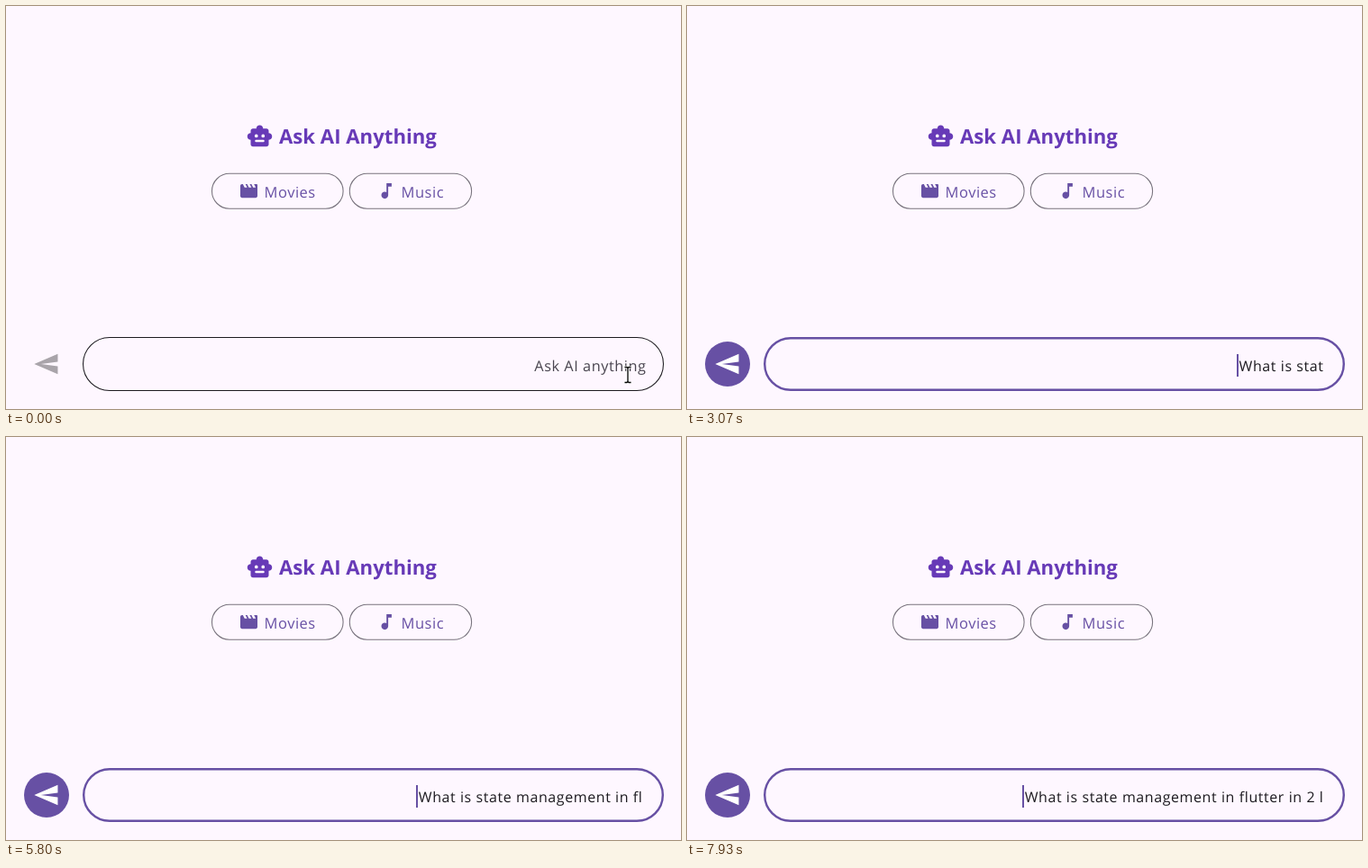
An HTML page for the animation above (8000 ms loop, 749 px wide and 448 px high).

```html
<!DOCTYPE html>
<html lang="en">
<head>
<meta charset="utf-8">
<title>Ask AI Anything</title>
<style>
  html, body { margin: 0; width: 100%; height: 100%; overflow: hidden; background: #fef7ff; }
  body { position: relative; font-family: "Open Sans", sans-serif; text-rendering: geometricPrecision; }
  svg { position: absolute; left: 0; top: 0; display: block; }
  .title { font-size: 22.2px; font-weight: 700; fill: #673ab7; }
  .chip rect { fill: none; stroke: #79747e; stroke-width: 1.07; }
  .chip text { font-size: 16.5px; font-weight: 500; letter-spacing: .5px; }
  .chip { fill: #6750a4; }
  .hint { font-size: 16.3px; letter-spacing: .55px; fill: #49454f; text-anchor: end; }
  .typed {
    position: absolute; left: 85px; top: 387px; width: 621.5px; height: 26px;
    direction: rtl; font-size: 16px; line-height: 26px; letter-spacing: .58px; color: #1d1b20;
  }
  .line { position: absolute; right: 0; top: 0; height: 26px; white-space: pre; }
  #caret { position: absolute; top: -.5px; width: 2.2px; height: 25px; background: #6750a4; }
</style>
</head>
<body>
<svg width="749" height="448" viewBox="0 0 749 448">
  <path transform="translate(266.5 130) scale(1.25)" fill="#673ab7" fill-rule="evenodd" d="M20 9V7c0-1.1-.9-2-2-2h-3c0-1.66-1.34-3-3-3S9 3.34 9 5H6c-1.1 0-2 .9-2 2v2c-1.66 0-3 1.34-3 3s1.34 3 3 3v4c0 1.1.9 2 2 2h12c1.1 0 2-.9 2-2v-4c1.66 0 3-1.34 3-3s-1.34-3-3-3zM7.5 11.5a1.5 1.5 0 0 1 3 0a1.5 1.5 0 0 1-3 0zM8.8 17a1 1 0 0 1 0-2h6.4a1 1 0 0 1 0 2zM13.5 11.5a1.5 1.5 0 0 1 3 0a1.5 1.5 0 0 1-3 0z"/>
  <text class="title" x="303" y="153">Ask AI Anything</text>

  <g class="chip">
    <rect x="228.5" y="186.3" width="145.6" height="38.9" rx="19.45"/>
    <path transform="translate(258.1 194.2) scale(.95)" d="M18 4l2 4h-3l-2-4h-2l2 4h-3l-2-4H8l2 4H7L5 4H4c-1.1 0-2 .9-2 2v12c0 1.1.9 2 2 2h16c1.1 0 2-.9 2-2V5q0-1-1-1z"/>
    <text x="286.6" y="213">Movies</text>
  </g>
  <g class="chip">
    <rect x="381.3" y="186.3" width="135.3" height="38.9" rx="19.45"/>
    <path transform="translate(410.8 194.2) scale(.95)" d="M12 3v10.55c-.59-.34-1.27-.55-2-.55-2.21 0-4 1.79-4 4s1.79 4 4 4 4-1.79 4-4V7h4V3z"/>
    <text x="438.6" y="213">Music</text>
  </g>

  <circle id="disc" cx="45" cy="398" r="25" fill="#6750a4"/>
  <path id="plane" transform="translate(59.93 383.07) scale(-1.244 1.244)" d="M2 21L23 12 2 3v7l15 2-15 2z"/>
  <rect id="field" fill="none"/>
  <text id="hint" class="hint" x="710.5" y="406">Ask AI anything</text>
</svg>

<div class="typed"><div class="line"><span id="words"></span><i id="caret"></i></div></div>

<svg id="pointer" width="749" height="448" viewBox="0 0 749 448" fill="none">
  <path id="beam" stroke="#fff" stroke-width="2.6" d="M686.5 401.5h2.5l1 1 1-1h2.5M690 402.5v15M686.5 418.5h2.5l1-1 1 1h2.5"/>
  <use href="#beam" id="ink"/>
  <path stroke="#000" stroke-width="1.3" d="M686.5 401.5h2.5l1 1 1-1h2.5M690 402.5v15M686.5 418.5h2.5l1-1 1 1h2.5"/>
</svg>

<script>
const LOOP = 8000;
const TEXT = "What is state management in flutter in 2 l";
const KEYS = [
  1330, 1530, 1670, 1930, 2000, 2270, 2400, 2470, 2600, 2800, 3000, 3070, 3270, 3400,
  3730, 3800, 4000, 4130, 4270, 4400, 4530, 4600, 4730, 4800, 4930, 5200, 5400, 5530,
  5730, 5800, 6000, 6200, 6330, 6400, 6530, 6600, 6870, 7000, 7130, 7530, 7670, 7930
];
const IDLE = [29, 27, 32], FOCUS = [103, 80, 164];
const FOCUS_START = 40, FOCUS_END = 330;

const $ = id => document.getElementById(id);
const [field, hint, disc, plane, words, caret, pointer] =
  ["field", "hint", "disc", "plane", "words", "caret", "pointer"].map($);
const show = (el, on) => { el.style.visibility = on ? "visible" : "hidden"; };
const mix = (a, b, p) => a + (b - a) * p;

// The outer edge stays put while the stroke grows inwards.
function drawField(p) {
  const w = mix(1.07, 2.4, p);
  const attrs = {
    x: 85 + w / 2, y: 368 + w / 2, width: 645 - w, height: 60 - w, rx: 30 - w / 2,
    "stroke-width": w,
    stroke: `rgb(${IDLE.map((c, i) => Math.round(mix(c, FOCUS[i], p)))})`
  };
  for (const k in attrs) field.setAttribute(k, attrs[k]);
}

function draw(t) {
  const p = Math.min(1, Math.max(0, (t - FOCUS_START) / (FOCUS_END - FOCUS_START)));
  drawField(p * p * (3 - 2 * p));

  const count = KEYS.filter(k => k <= t).length;
  const text = TEXT.slice(0, count);
  if (words.textContent !== text) words.textContent = text;

  const active = count > 0;
  caret.style.left = active ? "-3px" : "0";
  show(caret, t >= 130 && !(t >= 670 && t < 1130));
  show(hint, !active);
  show(pointer, !active);
  show(disc, active);
  plane.setAttribute("fill", active ? "#fff" : "#a9a4aa");
}

const start = performance.now();
function tick() {
  draw((performance.now() - start) % LOOP);
  requestAnimationFrame(tick);
}
tick();
</script>
</body>
</html>
```
